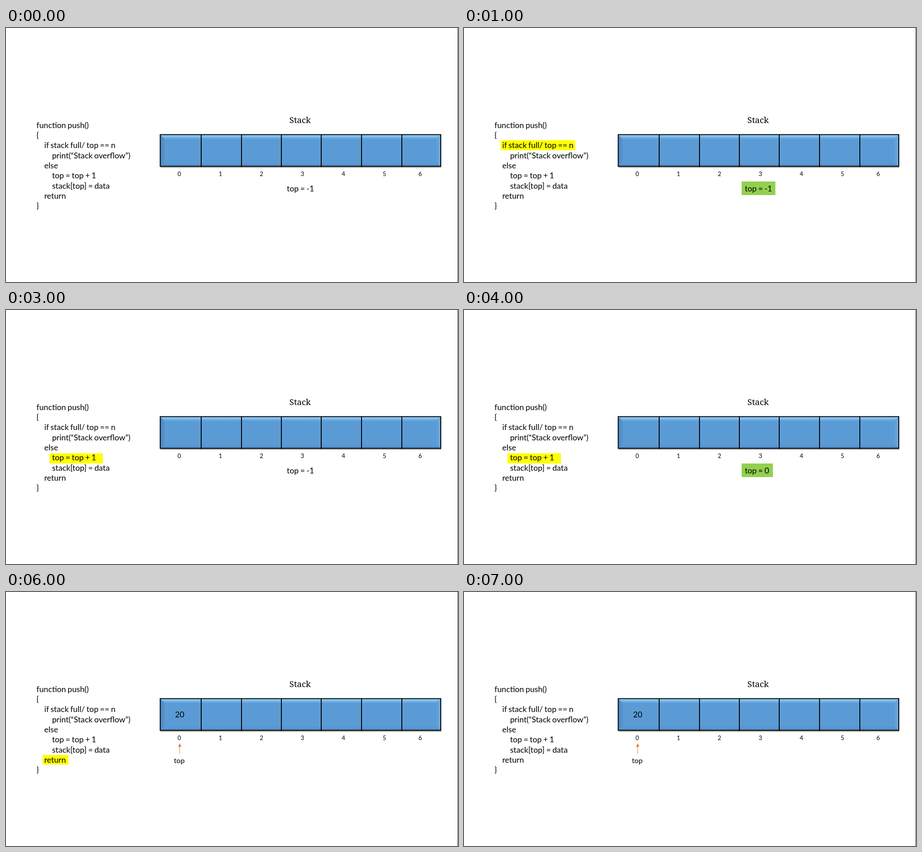
Write an HTML page that moves like this. It is 998 px wide and 561 px high and loops after 8000 ms.

```html
<!DOCTYPE html>
<html lang="en">
<head>
<meta charset="utf-8">
<title>Stack push</title>
<style>
  html, body { margin: 0; width: 100%; height: 100%; overflow: hidden; background: #fff; }
  svg { display: block; width: 998px; height: 561px; }
  text { font: 17.7px Lato, sans-serif; word-spacing: -1px; fill: #000; }
  .title { font: 18.6px "Noto Serif", serif; }
  .index { font-size: 13px; }
  .label { font-size: 16px; }
  .mid { text-anchor: middle; }
  .mark { fill: #ff0; }
  .value { fill: #92d050; }
</style>
</head>
<body>
<svg id="stage" viewBox="0 0 998 561">
  <defs>
    <linearGradient id="topEdge" x2="0" y2="1">
      <stop stop-color="#a2dcfc"/><stop offset=".5" stop-color="#78b9ea"/><stop offset="1" stop-color="#5b9bd5"/>
    </linearGradient>
    <linearGradient id="leftEdge">
      <stop stop-color="#4a86c0"/><stop offset="1" stop-color="#5896d0"/>
    </linearGradient>
    <linearGradient id="rightEdge">
      <stop stop-color="#5b9bd5"/><stop offset="1" stop-color="#6caae2"/>
    </linearGradient>
    <linearGradient id="bottomEdge" x2="0" y2="1">
      <stop stop-color="#5b9bd5"/><stop offset="1" stop-color="#528fc8"/>
    </linearGradient>
    <linearGradient id="shadow" x2="0" y2="1">
      <stop stop-color="#888"/><stop offset="1" stop-color="#fff"/>
    </linearGradient>
  </defs>
</svg>
<script>
const stage = document.getElementById('stage');
const STEP = 1000, STEPS = 8;
const timed = [];

// "steps" lists the steps in which the element shows; left out, it always shows.
function add(tag, attrs, steps, content = '') {
  const el = document.createElementNS('http://www.w3.org/2000/svg', tag);
  for (const key in attrs) el.setAttribute(key, attrs[key]);
  el.textContent = content;
  stage.append(el);
  if (steps) timed.push({ el, steps });
}
const box = (cls, x, y, width, height, steps) =>
  add('rect', { class: cls, x, y, width, height }, steps);
const text = (content, x, y, cls = '', steps) =>
  add('text', { x, y, class: cls }, steps, content);
const shape = (d, fill, steps) => add('path', { d, fill }, steps);

// Code listing
box('mark', 81, 248, 164.5, 22, [1]);
box('mark', 80, 293, 40.5, 24, [2]);
box('mark', 96, 316.5, 118, 22.5, [3, 4]);
box('mark', 97, 337, 139, 21, [5]);
box('mark', 81, 360, 57, 21, [6]);
[
  [0, 'function push()'],
  [0, '{'],
  [1, 'if stack full/ top == n'],
  [2, 'print(“Stack overflow”)'],
  [1, 'else'],
  [2, 'top = top + 1'],
  [2, 'stack[top] = data'],
  [1, 'return'],
  [0, '}']
].forEach(([indent, line], i) => text(line, 67.3 + 17.2 * indent, 220.5 + 22.35 * i));

// Bevelled bar with its cells
text('Stack', 649.4, 210.3, 'title mid');
shape('M341 306H961V310H341Z', 'url(#shadow)');
shape('M340 235H960V305H340Z', '#5b9bd5');
shape('M340 235V305L351 295V246Z', 'url(#leftEdge)');
shape('M960 235V305L949 295V246Z', 'url(#rightEdge)');
shape('M340 305H960L949 297H351Z', 'url(#bottomEdge)');
shape('M340 235H960L949 246H351Z', 'url(#topEdge)');
add('path', {
  d: 'M340.5 235.5H960V305.5H340.5Z' +
    [431, 520, 608, 696, 785, 874].map(x => `M${x} 235V307`).join(''),
  fill: 'none', stroke: '#000', 'stroke-width': 2
});
[382.5, 473.5, 564, 654.5, 745, 835.5, 914.5]
  .forEach((x, i) => text(i, x, 326.5, 'index mid'));

// Top counter
box('value', 613, 339, 74.5, 30, [1]);
box('value', 613, 339, 69, 30, [4]);
text('top = -1', 620, 360.5, '', [0, 1, 2, 3]);
text('top = 0', 620, 360.5, '', [4]);

// Pushed value and pointer
box('value', 365, 255, 35.5, 30, [5]);
text('20', 382.5, 276.5, 'mid', [5]);
text('20', 383.5, 276.5, 'mid', [6, 7]);
shape('M383 341H384V357.5H383Z M383.5 334L387 342H380Z', '#ed7d31', [5, 6, 7]);
text('top', 382.5, 378, 'label mid', [5, 6, 7]);

shape('M997 0H998V561H997Z', '#444');

let shown = -1;
function draw(now) {
  const step = Math.floor(now / STEP) % STEPS;
  if (step !== shown) {
    shown = step;
    for (const { el, steps } of timed)
      el.style.display = steps.includes(step) ? '' : 'none';
  }
}
const start = performance.now();
function tick() {
  draw(performance.now() - start);
  requestAnimationFrame(tick);
}
tick();
</script>
</body>
</html>
```
